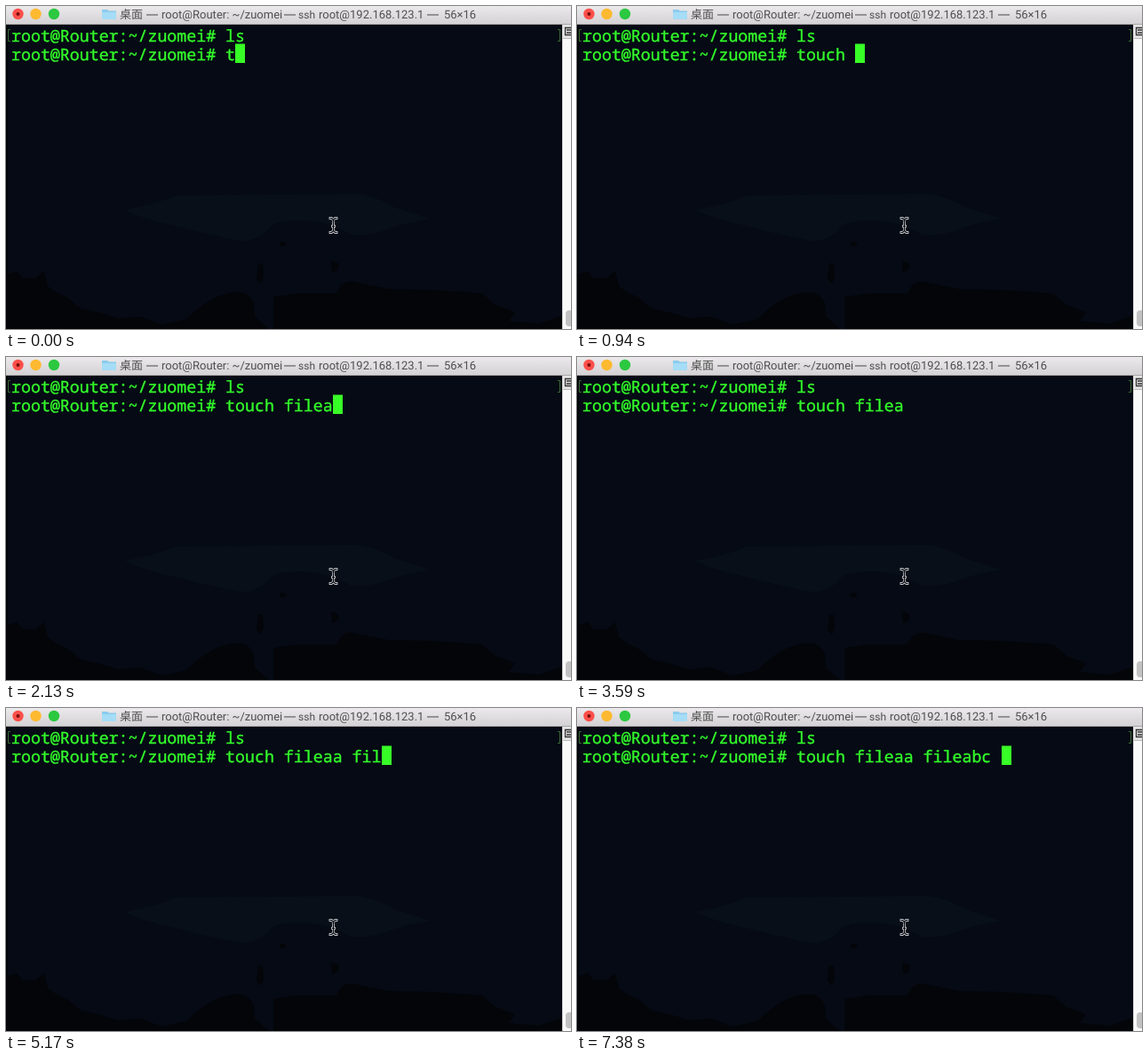
An HTML page that plays this animation: 636x363 px, repeating every 8000 ms.

```html
<!DOCTYPE html>
<html lang="en">
<head>
<meta charset="utf-8">
<title>Terminal</title>
<style>
html, body { margin: 0; width: 100%; height: 100%; overflow: hidden; background: #050a14; }
svg { display: block; width: 636px; height: 363px; }
text { text-rendering: geometricPrecision; white-space: pre; }
.term { font: 18.28px "Noto Sans Mono", "DejaVu Sans Mono", monospace; fill: #33fb2a; stroke: #33fb2a; stroke-width: .4; }
.title { font: 13px Roboto, "Noto Sans CJK SC", "Noto Sans CJK", sans-serif; fill: #505050; }
.dash { font: 13px Inter, sans-serif; }
</style>
</head>
<body>
<svg viewBox="0 0 636 363">
  <defs>
    <linearGradient id="bar" x2="0" y2="1">
      <stop stop-color="#ebe9eb"/>
      <stop offset="1" stop-color="#d4d2d4"/>
    </linearGradient>
  </defs>

  <!-- wallpaper -->
  <rect width="636" height="363" fill="#050a14"/>
  <path fill="#080f19" d="M133 229 Q165 224 192 213 L395 211 Q423 216 436 226 L478 239 Q452 243 432 250 Q410 259 388 257 Q366 243 336 241 Q302 240 296 250 Q284 264 264 264 Q215 254 190 247 Q155 240 133 229Z"/>
  <g fill="#030509">
    <path d="M0 302 L12 298 19 306 33 306 43 298 47 315 57 322 70 328 84 340 107 345 126 351 151 349 175 358 203 352 Q228 327 250 323 Q272 317 279 334 L280 349 296 363 H0Z"/>
    <path d="M301 363 V327 L328 323 372 323 Q379 305 396 311 L430 318 480 319 536 323 551 336 573 344 566 354 600 357 626 348 V363Z"/>
    <path d="M284 289 L289 290 290 304 287 312 282 307Z"/>
    <path d="M366 286 L375 290 373 297 367 299Z"/>
    <rect x="308" y="265" width="7" height="5" rx="2"/>
    <rect y="21" width="2" height="342"/>
  </g>

  <!-- title bar -->
  <rect width="636" height="20" fill="url(#bar)"/>
  <rect y="20" width="636" height="1" fill="#a9a8a9"/>
  <circle cx="13.5" cy="9" r="6.200" fill="#fc4f4a"/>
  <circle cx="33.5" cy="9" r="6.200" fill="#fdb92f"/>
  <circle cx="54" cy="9" r="6.200" fill="#2bc840"/>
  <circle cx="13.5" cy="9" r="2" fill="#7a0d0b"/>
  <path fill="#8bcbed" d="M108 4 h6 l2 1.500 h8 v9.500 h-16Z"/>
  <path fill="#a5dcf6" d="M108 7 h16 v8 h-16Z"/>
  <g class="title">
    <text x="128" y="14">桌面</text>
    <text x="175" y="14">root@Router: ~/zuomei</text>
    <text x="329" y="14" font-size="12">ssh</text>
    <text x="352" y="14">root@192.168.123.1</text>
    <text x="493" y="14">56×16</text>
    <g class="dash">
      <text x="158" y="14">—</text>
      <text x="313" y="14">—</text>
      <text x="474" y="14">—</text>
    </g>
  </g>

  <!-- scroll bar -->
  <rect x="626" y="21" width="10" height="342" fill="#f9f9f9"/>
  <rect x="626" y="21" width="1" height="342" fill="#d8d8d8"/>
  <rect x="627" y="21" width="9" height="15" fill="#e4e4e4"/>
  <path d="M627 36.500 H636" stroke="#bbb"/>
  <path d="M636 24.500 H629.500 V32.500 H636 M631 27 H636 M631 30 H636" fill="none" stroke="#333" stroke-width="1.300"/>
  <rect x="630" y="342" width="10" height="18" rx="4" fill="#c2c2c2"/>

  <!-- terminal -->
  <path d="M5 26.500 H2.500 V39.500 H5 M621 26.500 H623.500 V39.500 H621" fill="none" stroke="#3d6a35"/>
  <text class="term" x="6" y="39.500">root@Router:~/zuomei# ls</text>
  <text class="term" x="6" y="60.500" id="line"></text>
  <rect id="cursor" y="42.500" width="11" height="21.500" fill="#38fe27"/>

  <!-- pointer -->
  <g fill="none" stroke-linecap="square">
    <path id="beam" d="M365 238.500 H366.500 L368.500 240.500 370.500 238.500 H372 M368.500 240.500 V252.500 M365 254.500 H366.500 L368.500 252.500 370.500 254.500 H372 M367.500 247.500 H369.500" stroke="#c4c6c8" stroke-width="2.800"/>
    <path d="M365 238.500 H366.500 L368.500 240.500 370.500 238.500 H372 M368.500 240.500 V252.500 M365 254.500 H366.500 L368.500 252.500 370.500 254.500 H372 M367.500 247.500 H369.500" stroke="#080c14" stroke-width="1.200"/>
  </g>
</svg>
<script>
const LOOP = 8000, ADVANCE = 10.97;
const prompt = "root@Router:~/zuomei# ";
const command = "touch fileaa fileabc ";
// [time, typed characters]
const keys = [
  [0, 1], [60, 2], [230, 3], [410, 4], [590, 5], [940, 6], [1300, 8],
  [1480, 9], [1650, 10], [2130, 11], [3710, 12], [4280, 13], [4760, 14],
  [4930, 15], [5170, 16], [5350, 17], [6060, 18], [6360, 19], [6660, 20], [7380, 21]
];
const line = document.getElementById("line");
const cursor = document.getElementById("cursor");
const start = performance.now();

function draw(now) {
  const t = Math.max(0, now - start) % LOOP;
  const typed = keys.findLast(([time]) => time <= t)[1];
  const text = prompt + command.slice(0, typed);
  if (line.textContent !== text) line.textContent = text;
  cursor.setAttribute("x", Math.round(6 + text.length * ADVANCE));
  cursor.style.visibility = t >= 3590 && t < 3710 ? "hidden" : "visible";
  requestAnimationFrame(draw);
}
draw(start);
</script>
</body>
</html>
```
